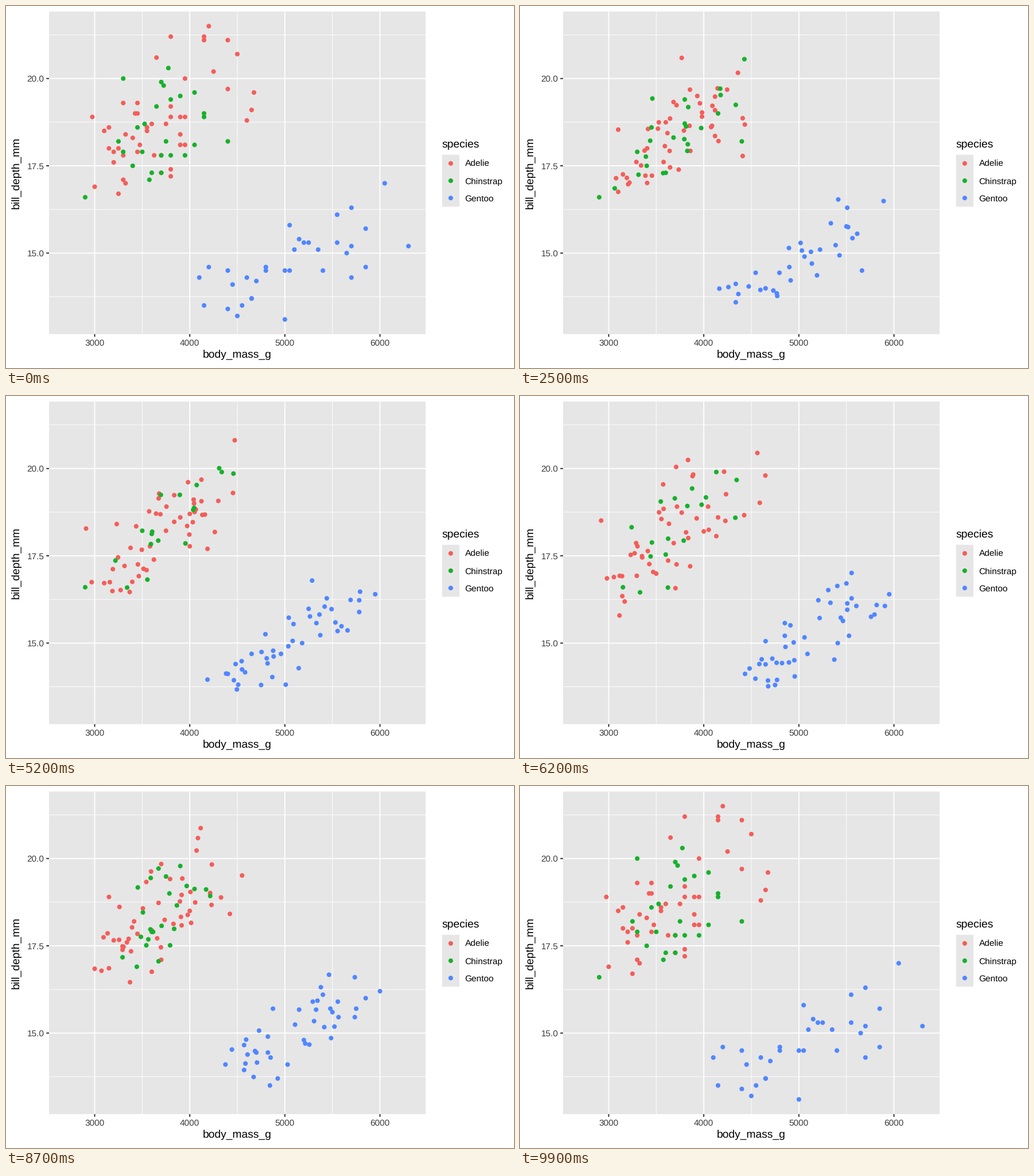
Recreate the animation shown at these times as a matplotlib script. Size 885 by 632 pixels, loop 10 s.

```python
import numpy as np
import matplotlib.pyplot as plt
from matplotlib.animation import FuncAnimation
from matplotlib.patches import Rectangle

W, H, DPI = 885, 632, 100
PT = 72 / DPI  # points per pixel
FRAMES, INTERVAL = 100, 100

plt.rcParams["font.family"] = "Liberation Sans"
plt.rcParams["text.hinting"] = "none"

RED, GREEN, BLUE = "#F35E5A", "#17B12B", "#5086FF"
GREY, LABEL, TICK = "#E6E6E6", "#3C3C3C", "#262626"

# Panel edges in pixels and the data range they span
LEFT, RIGHT, TOP, BOTTOM = 75.0, 731.0, 9.6, 572.8
X0, X1, Y0, Y1 = 2520, 6480, 12.68, 21.92

NA = (np.nan, np.nan)

# (body mass, bill depth) per species and year; order pairs points across years
adelie_07 = [
    (3750, 18.7), (3800, 17.4), (3250, 18.0), NA, (3450, 19.3), (3650, 20.6),
    (3625, 17.8), (4675, 19.6), (3475, 18.1), (4250, 20.2), (3300, 17.1),
    (3700, 17.3), (3200, 17.6), (3800, 21.2), (4400, 21.1), (3700, 17.8),
    (3450, 19.0), (4500, 20.7), (3325, 18.4), (4200, 21.5), (3400, 18.3),
    (3600, 18.7), (3800, 19.2), (3950, 18.1), (3800, 17.2), (3800, 18.9),
    (3550, 18.6), (3200, 17.9), (3150, 18.6), (3950, 18.9), (3250, 16.7),
    (3900, 18.1), (3300, 17.8), (3900, 18.9), (3325, 17.0), (4150, 21.1),
    (3950, 20.0), (3550, 18.5), (3300, 19.3), (4650, 19.1), (3150, 18.0),
    (3900, 18.4), (3100, 18.5), (4400, 19.7), (3000, 16.9), (4600, 18.8),
    (3425, 19.0), (2975, 18.9), (3450, 17.9), (4150, 21.2)]
adelie_08 = [
    (3500, 17.7), (4300, 18.9), (3450, 17.9), (4050, 19.5), (2900, 18.1),
    (3700, 18.6), (3550, 17.5), (3800, 18.8), (2850, 16.6), (3750, 19.1),
    (3150, 16.9), (4400, 21.1), (3600, 17.0), (4050, 18.2), (2850, 17.1),
    (3950, 18.0), (3350, 16.2), (4100, 19.1), (3050, 16.6), (4450, 19.4),
    (3600, 19.0), (3900, 18.4), (3550, 17.2), (4150, 18.9), (3700, 17.5),
    (4250, 18.5), (3700, 16.8), (3900, 19.4), (3550, 16.1), (4000, 19.1),
    (3200, 17.2), (4700, 17.6), (3800, 18.8), (4200, 19.4), (3350, 17.8),
    (3550, 20.3), (3800, 19.5), (3500, 18.6), (3950, 19.2), (3600, 18.8),
    (3550, 18.0), (4300, 18.1), (3400, 17.1), (4450, 18.1), (3300, 17.3),
    (4300, 18.9), (3700, 18.6), (4350, 18.5), (2900, 16.1), (4100, 18.5)]
adelie_09 = [
    (3725, 17.9), (4725, 20.0), (3075, 16.0), (4250, 20.0), (2925, 18.6),
    (3550, 18.9), (3750, 17.2), (3900, 20.0), (3175, 17.0), (4775, 19.0),
    (3825, 16.5), (4600, 20.3), (3200, 17.7), (4275, 19.5), (3900, 20.7),
    (4075, 18.3), (2900, 17.0), (3775, 20.5), (3350, 17.0), (3325, 18.6),
    (3150, 17.2), (3500, 19.8), (3450, 17.0), (3875, 18.5), (3050, 15.9),
    (4000, 19.0), (3275, 17.6), (4300, 18.3), (3050, 17.1), (4000, 18.0),
    (3325, 17.9), (3500, 19.2), (3500, 18.5), (4475, 18.5), (3425, 17.6),
    (3900, 17.5), (3175, 17.5), (3975, 20.1), (3400, 16.5), (4250, 17.9),
    (3400, 17.1), (3475, 17.2), (3050, 15.5), (3725, 17.0), (3000, 16.8),
    (3650, 18.7), (4250, 18.6), (3475, 18.4), (3450, 17.8), (3750, 18.1),
    (3700, 17.1), (4000, 18.5)]

gentoo_07 = [
    (4500, 13.2), (5700, 16.3), (4450, 14.1), (5700, 15.2), (5400, 14.5),
    (4550, 13.5), (4800, 14.6), (5200, 15.3), (4400, 13.4), (5150, 15.4),
    (4650, 13.7), (5550, 16.1), (4650, 13.7), (5850, 14.6), (4200, 14.6),
    (5850, 15.7), (4150, 13.5), (6300, 15.2), (4800, 14.5), (5350, 15.1),
    (5700, 14.3), (5000, 14.5), (4400, 14.5), (5050, 15.8), (5000, 13.1),
    (5100, 15.1), (4100, 14.3), (5650, 15.0), (4600, 14.3), (5550, 15.3),
    (5250, 15.3), (4700, 14.2), (5050, 14.5), (6050, 17.0)]
gentoo_08 = [
    (5150, 14.8), (5400, 16.3), (4950, 13.7), (5250, 17.3), (4350, 13.6),
    (5350, 15.7), (3950, 13.7), (5700, 16.0), (4300, 13.7), (4750, 15.0),
    (5550, 15.9), (4900, 13.9), (4200, 13.9), (5400, 15.9), (5100, 13.3),
    (5300, 15.8), (4850, 14.2), (5300, 14.1), (4400, 14.4), (5000, 15.0),
    (4900, 14.4), (5050, 15.4), (4300, 13.9), (5000, 15.0), (4450, 14.5),
    (5550, 15.3), (4200, 13.8), (5300, 14.9), (4400, 13.9), (5650, 15.7),
    (4700, 14.2), (5700, 16.8), (4650, 14.4), (5800, 16.2), (4700, 14.2),
    (5550, 15.0), (4750, 15.0), (5000, 15.6), (5100, 15.6), (5200, 14.8),
    (4700, 15.0), (5800, 16.0), (4600, 14.2), (6000, 16.3), (4750, 13.8),
    (5950, 16.4)]
gentoo_09 = [
    (4625, 14.5), (5450, 15.6), (4725, 14.6), (5350, 15.9), (4750, 13.8),
    (5600, 17.3), (4600, 14.4), (5300, 14.2), (4875, 14.0), (5550, 17.0),
    (4950, 15.0), (5400, 17.1), (4750, 14.5), (5650, 16.1), (4850, 14.7),
    (5200, 15.7), (4925, 15.8), (4875, 14.6), (4625, 14.4), (5250, 16.5),
    (4850, 15.0), (5600, 17.0), (4975, 15.5), (5500, 15.0), (4725, 13.8),
    (5500, 16.1), (4700, 14.7), (5500, 15.8), (4575, 14.0), (5500, 15.1),
    (5000, 15.2), (5950, 15.9), (4650, 15.2), (5500, 16.3), (4375, 14.1),
    (5850, 16.0), (4875, 15.7), (6000, 16.2), (4925, 13.7), NA,
    (4850, 14.3), (5750, 15.7), (5200, 14.8), (5400, 16.1)]

chinstrap_07 = [
    (3500, 17.9), (3900, 19.5), (3650, 19.2), (3525, 18.7), (3725, 19.8),
    (3950, 17.8), (3250, 18.2), (3750, 18.2), (4150, 18.9), (3700, 19.9),
    (3800, 17.8), (3775, 20.3), (3700, 17.3), (4050, 18.1), (3575, 17.1),
    (4050, 19.6), (3300, 20.0), (3700, 17.8), (3450, 18.6), (4400, 18.2),
    (3600, 17.3), (3400, 17.5), (2900, 16.6), (3800, 19.4), (3300, 17.9),
    (4150, 19.0)]
chinstrap_08 = [
    (3400, 18.4), (3800, 19.0), (3700, 17.8), (4550, 20.0), (3200, 16.6),
    (4300, 20.8), (3350, 16.7), (4100, 18.8), (3600, 18.6), (3900, 16.8),
    (3850, 18.3), (4800, 20.7), (2700, 16.6), (4500, 19.9), (3950, 19.5),
    (3650, 17.5), (3550, 19.1), (3500, 17.0)]
chinstrap_09 = [
    (3675, 17.9), (4450, 18.5), (3400, 17.9), (4300, 19.6), (3250, 18.7),
    (3675, 17.3), (3325, 16.4), (3950, 19.0), (3600, 17.3), (4050, 19.7),
    (3350, 17.3), (3450, 18.8), (3250, 16.6), (4050, 19.9), (3800, 18.8),
    (3525, 19.4), (3950, 19.5), (3650, 16.5), (3650, 17.0), (4000, 19.8),
    (3400, 18.1), (3775, 18.2), (4100, 19.0), (3775, 18.7)]

GROUPS = [
    (RED, [np.array(d) for d in (adelie_07, adelie_08, adelie_09)]),
    (BLUE, [np.array(d) for d in (gentoo_07, gentoo_08, gentoo_09)]),
    (GREEN, [np.array(d) for d in (chinstrap_07, chinstrap_08, chinstrap_09)]),
]

# (zero point, first moving frame, arrival) of each linear move
MOVES = [(11, 12, 33), (44, 46, 66), (78, 79, 99)]


def px(mass):
    return LEFT + (mass - X0) / (X1 - X0) * (RIGHT - LEFT)


def py(depth):
    return BOTTOM - (depth - Y0) / (Y1 - Y0) * (BOTTOM - TOP)


def phase(k):
    """State index and progress towards the next state."""
    state = 0
    for i, (zero, first, end) in enumerate(MOVES):
        if first <= k < end:
            return i, (k - zero) / (end - zero)
        if k >= end:
            state = (i + 1) % 3
    return state, 0


def blend(a, b, t):
    """Move paired points; unpaired ones wait in place until arrival."""
    pos = a.copy()
    if t > 0:
        n = min(len(a), len(b))
        pos[:n] += (b[:n] - a[:n]) * t
    return pos[np.isfinite(pos[:, 0])]


fig = plt.figure(figsize=(W / DPI, H / DPI), dpi=DPI, facecolor="white")
ax = fig.add_axes([0, 0, 1, 1])
ax.set_xlim(0, W)
ax.set_ylim(H, 0)
ax.axis("off")


def box(x, y, w, h):
    ax.add_patch(Rectangle((x, y), w, h, fc=GREY, ec="none", lw=0, snap=False))


def line(xs, ys, color, width):
    ax.plot(xs, ys, color=color, lw=width * PT, snap=False,
            solid_capstyle="butt", zorder=2)


def label(x, y, s, size, color="black", **kw):
    ax.text(x, y, s, fontsize=size * PT, color=color, va="baseline", **kw)


def dots(x, y, colors):
    return ax.scatter(x, y, s=(8.1 * PT) ** 2, c=colors, linewidths=0, zorder=4)


BIG, SMALL = 19.24, 15.39
MAJOR, MINOR = 1.87, 0.94

box(LEFT, TOP, RIGHT - LEFT, BOTTOM - TOP)
for m in (3500, 4500, 5500):
    line([px(m)] * 2, [TOP, BOTTOM], "white", MINOR)
for d in (13.75, 16.25, 18.75, 21.25):
    line([LEFT, RIGHT], [py(d)] * 2, "white", MINOR)
for d in (15.0, 17.5, 20.0):
    line([LEFT, RIGHT], [py(d)] * 2, "white", MAJOR)
    line([LEFT - 4.8, LEFT], [py(d)] * 2, TICK, MAJOR)
    label(LEFT - 8.6, py(d) + 5.5, f"{d:.1f}", SMALL, LABEL, ha="right")
for m in (3000, 4000, 5000, 6000):
    line([px(m)] * 2, [TOP, BOTTOM], "white", MAJOR)
    line([px(m)] * 2, [BOTTOM, BOTTOM + 4.8], TICK, MAJOR)
    label(px(m), 592.6, str(m), SMALL, LABEL, ha="center")

label((LEFT + RIGHT) / 2, 614, "body_mass_g", BIG, ha="center")
label(23.3, (TOP + BOTTOM) / 2, "bill_depth_mm", BIG, ha="center",
      rotation=90, rotation_mode="anchor")

KEY, KEY_X, KEY_Y = 30.22, 759.7, 259.7
box(KEY_X, KEY_Y, KEY, 3 * KEY)
label(KEY_X, 246.8, "species", BIG)
names = ["Adelie", "Chinstrap", "Gentoo"]
mids = [KEY_Y + KEY * (i + 0.5) for i in range(3)]
dots([KEY_X + KEY / 2] * 3, mids, [RED, GREEN, BLUE])
for name, y in zip(names, mids):
    label(KEY_X + KEY + 9.6, y + 5.5, name, SMALL)

cloud = dots([], [], None)


def draw(k):
    state, t = phase(k)
    points, colors = [], []
    for color, years in GROUPS:
        pos = blend(years[state], years[(state + 1) % 3], t)
        points.append(np.column_stack([px(pos[:, 0]), py(pos[:, 1])]))
        colors += [color] * len(pos)
    cloud.set_offsets(np.vstack(points))
    cloud.set_facecolors(colors)
    return (cloud,)


anim = FuncAnimation(fig, draw, frames=FRAMES, interval=INTERVAL,
                     init_func=lambda: draw(0), repeat=True, repeat_delay=0)
plt.show()
```
